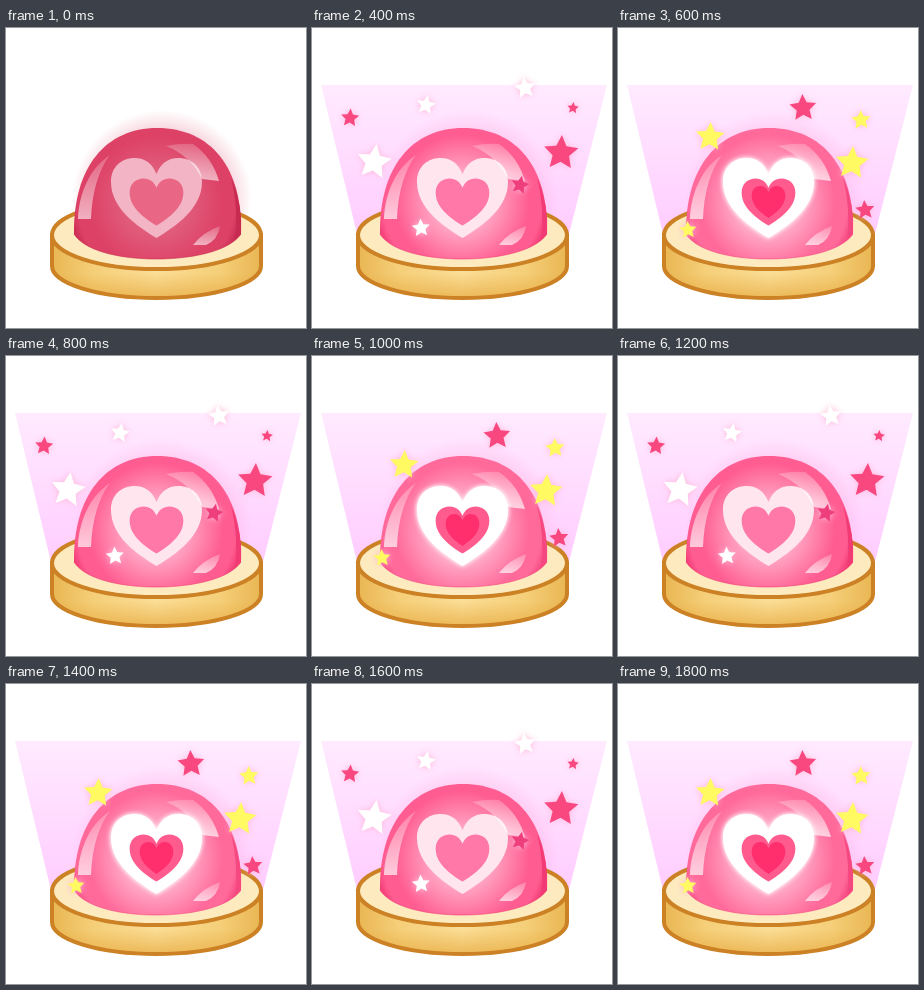
An HTML page that plays this animation: 300 px wide and 300 px high, repeating every 2 s.

```html
<!DOCTYPE html>
<html lang="en">
<head>
<meta charset="utf-8">
<title>Heart lamp</title>
<style>
html, body { margin: 0; width: 100%; height: 100%; overflow: hidden; background: #fff; }
svg { display: block; width: 100%; height: 100%; }
svg { --mid: #e26783; --body: #dd4166; --rim: #c92a51; --heart: #f3b4c5; --inner: #e96784; --glow: #d93a5f; --shine: .65; }
svg.on { --mid: #ffbdd3; --body: #ff5d92; --rim: #f23a74; --heart: #ffe6ee; --inner: #ff78a8; --glow: #ff8cc4; --shine: .75; }
svg.bright { --mid: #ffc6d9; --body: #ff6a9b; --rim: #f64880; --heart: #fff; --inner: #ff5b8e; }
.lit, .first, .second { visibility: hidden; }
.on .lit, .warm .first, .bright .second { visibility: visible; }
.stars { filter: drop-shadow(0 0 3px #ffb9d8); }
</style>
</head>
<body>
<svg id="lamp" viewBox="0 0 300 300">
  <defs>
    <linearGradient id="beam" x1="0" y1="0" x2="0" y2="1">
      <stop offset="0" stop-color="#f0f" stop-opacity=".08"/>
      <stop offset="1" stop-color="#f0f" stop-opacity=".2"/>
    </linearGradient>
    <radialGradient id="halo">
      <stop offset=".78" style="stop-color:var(--glow)" stop-opacity=".2"/>
      <stop offset="1" style="stop-color:var(--glow)" stop-opacity="0"/>
    </radialGradient>
    <radialGradient id="dome" gradientUnits="userSpaceOnUse" cx="150" cy="174" r="88">
      <stop offset=".2" style="stop-color:var(--mid)"/>
      <stop offset=".76" style="stop-color:var(--body)"/>
      <stop offset=".9" style="stop-color:var(--body)"/>
      <stop offset="1" style="stop-color:var(--rim)"/>
    </radialGradient>
    <linearGradient id="side">
      <stop offset="0" stop-color="#e9b653"/>
      <stop offset=".2" stop-color="#f5cf79"/>
      <stop offset=".5" stop-color="#fbde97"/>
      <stop offset=".8" stop-color="#f5cf79"/>
      <stop offset="1" stop-color="#e9b653"/>
    </linearGradient>
    <linearGradient id="shade" x1="0" y1="0" x2="0" y2="1">
      <stop offset=".6" stop-color="#e6a93f" stop-opacity="0"/>
      <stop offset="1" stop-color="#e6a93f" stop-opacity=".7"/>
    </linearGradient>
    <linearGradient id="shine" x1="0" y1="0" x2="0" y2="1">
      <stop offset="0" stop-color="#fff" stop-opacity=".3"/>
      <stop offset="1" stop-color="#fff" stop-opacity=".9"/>
    </linearGradient>
    <filter id="soft" x="-30%" y="-30%" width="160%" height="160%"><feGaussianBlur stdDeviation="2"/></filter>
    <path id="heart" d="M0 40C-20 28-45.5 10-45.5-16C-45.5-32-34-40-22-40C-11-40-4-34 0-24C4-34 11-40 22-40C34-40 45.5-32 45.5-16C45.5 10 20 28 0 40Z"/>
    <path id="base" d="M46 207V238A104.5 32 0 0 0 255 238V207Z"/>
  </defs>

  <path class="lit" d="M9 57H295L257 206H45Z" fill="url(#beam)"/>
  <ellipse cx="156" cy="170" rx="90" ry="88" fill="url(#halo)"/>

  <use href="#base" fill="url(#side)"/>
  <g stroke="#cb8124" stroke-width="4">
    <use href="#base" fill="url(#shade)"/>
    <ellipse cx="150.5" cy="207" rx="104.5" ry="34" fill="#fdebbf"/>
  </g>

  <path d="M68 206C67 139 100 100 151 100C205 100 237 140 235 206C224 222 190 231 150 231C111 231 78 222 68 206Z" fill="url(#dome)"/>
  <path d="M225 149Q237 178 235 206L229 211Q233 182 225 149Z" style="fill:var(--rim)"/>
  <path d="M68 206C78 222 111 231 150 231C190 231 224 222 235 206" fill="none" style="stroke:var(--rim)" stroke-opacity=".6"/>
  <use class="second" href="#heart" transform="translate(150.5 170) scale(1.02)" fill="#fff" filter="url(#soft)"/>
  <use href="#heart" transform="translate(150.5 170)" style="fill:var(--heart)"/>
  <use href="#heart" transform="translate(150.5 174) scale(.59)" style="fill:var(--inner)"/>
  <use class="second" href="#heart" transform="translate(150.5 174) scale(.37 .4)" fill="#ff2f6e"/>

  <g fill="url(#shine)" style="opacity:var(--shine)">
    <path d="M104 127C84 140 73 165 72 191H85C86 165 92 143 104 127Z"/>
    <path d="M160 118Q175 115 187 116Q206 129 213 153L196 151Q185 128 160 118Z"/>
    <path d="M187 217Q197 204 214 198Q212 212 200 217Z"/>
  </g>
  <g id="first" class="first stars"></g>
  <g id="second" class="second stars"></g>
</svg>
<script>
const lamp = document.getElementById('lamp');
const pink = '#f94880', white = '#fff', yellow = '#fffa62';

// Each star: x, y, radius, tilt in degrees, colour
const stars = {
  first: [
    [38, 90, 9.5, 4, pink], [62, 134, 18, 8, white], [114, 77, 10, 10, white],
    [213, 60, 11, -8, white], [261, 80, 6, 5, pink], [249, 125, 18, 3, pink],
    [208, 157, 9.5, 12, '#ee3f7c'], [109, 200, 9.5, -4, white]
  ],
  second: [
    [92, 109, 15, 3, yellow], [185, 80, 14, -3, pink], [243, 92, 10, -3, yellow],
    [234, 135, 17, 4, yellow], [247, 182, 10, -5, pink], [70, 202, 9, -4, yellow]
  ]
};

function star([x, y, r, tilt, color]) {
  const points = Array.from({ length: 10 }, (_, i) => {
    const a = (i * 36 + tilt - 90) * Math.PI / 180;
    const d = i % 2 ? r * 0.48 : r;
    return `${x + d * Math.cos(a)},${y + d * Math.sin(a)}`;
  });
  return `<polygon points="${points.join(' ')}" fill="${color}"/>`;
}

for (const id in stars) document.getElementById(id).innerHTML = stars[id].map(star).join('');

// Dark for 400 ms, then two lit states alternate every 200 ms
function draw() {
  const step = Math.floor(performance.now() % 2000 / 200);
  const look = step < 2 ? '' : step % 2 ? 'on bright' : 'on warm';
  lamp.setAttribute('class', look);
  requestAnimationFrame(draw);
}
draw();
</script>
</body>
</html>
```
